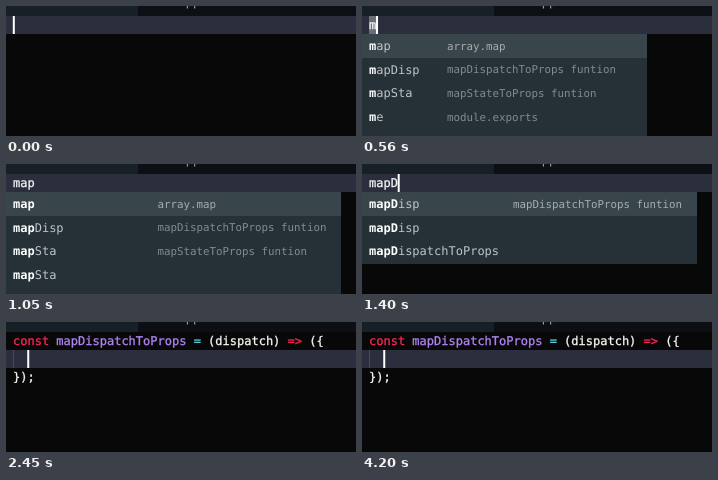
These frames come from a looping animation (350 px wide and 130 px high, 4270 ms). An HTML page:

```html
<!DOCTYPE html>
<html lang="en">
<head>
<meta charset="utf-8">
<title>Editor snippet completion</title>
<style>
  html, body { margin: 0; width: 100%; height: 100%; overflow: hidden; background: #080809; }
  svg { display: block; }
  text {
    font: 12px "DejaVu Sans Mono", "Liberation Mono", monospace;
    white-space: pre;
    text-rendering: geometricPrecision;
    fill: #f4f4f4;
  }
  .code { stroke-width: .3px; stroke: currentColor; }
  .label { fill: #bcc5c9; }
  .match { fill: #fff; font-weight: bold; }
  .note { font-size: 10.8px; fill: #7d8c94; }
  .first { fill: #a3adb2; }
  .tab { fill: #a0a6aa; }
</style>
</head>
<body>
<svg id="stage" width="350" height="130" viewBox="0 0 350 130"></svg>
<script>
const LOOP = 4270;
const LEFT = 7;
const CHAR = 7.224;
const LINE = 18;
const ROW = 23.7;
const stage = document.getElementById('stage');

function add(parent, tag, attrs, content) {
  const el = document.createElementNS('http://www.w3.org/2000/svg', tag);
  for (const key in attrs) el.setAttribute(key, attrs[key]);
  if (content) el.textContent = content;
  parent.appendChild(el);
  return el;
}

function rect(parent, x, y, width, height, fill) {
  return add(parent, 'rect', { x, y, width, height, fill });
}

function codeLine(parent, y, parts) {
  const line = add(parent, 'text', { x: LEFT, y, class: 'code' });
  for (const [content, color] of parts)
    add(line, 'tspan', { style: `fill:${color};color:${color}` }, content);
}

const DISPATCH = 'mapDispatchToProps funtion';
const STATE = 'mapStateToProps funtion';
const lists = {
  narrow: {
    width: 285, noteX: 85,
    rows: [['map', 'array.map'], ['mapDisp', DISPATCH], ['mapSta', STATE], ['me', 'module.exports']]
  },
  wide: {
    width: 335, noteX: 151.5,
    rows: [['map', 'array.map'], ['mapDisp', DISPATCH], ['mapSta', STATE], ['mapSta', '']]
  },
  short: {
    width: 335, noteX: 151,
    rows: [['mapDisp', DISPATCH], ['mapDisp', ''], ['mapDispatchToProps', '']]
  }
};

function drawList(parent, { width, noteX, rows }, matched) {
  rect(parent, 0, 28, width, rows.length > 3 ? 102 : 72, '#263137');
  rect(parent, 0, 28, width, 24, '#38454b');
  rows.forEach(([label, note], i) => {
    const y = 44 + i * ROW;
    const text = add(parent, 'text', { x: LEFT, y, class: 'label' });
    add(text, 'tspan', { class: 'match' }, label.slice(0, matched));
    add(text, 'tspan', {}, label.slice(matched));
    if (note) add(parent, 'text', { x: noteX, y: y - .5, class: i ? 'note' : 'note first' }, note);
  });
}

function drawSnippet(parent) {
  const white = '#f6f6f2', red = '#ff2558', purple = '#b084f5', cyan = '#5fd3ee';
  codeLine(parent, 23, [
    ['const ', red], ['mapDispatchToProps', purple], [' = ', cyan],
    ['(dispatch) ', white], ['=> ', red], ['({', white]
  ]);
  codeLine(parent, 23 + 2 * LINE, [['});', white]]);
  rect(parent, LEFT, 28, 1, LINE, '#464b5a');
}

// start, typed text, list, matched letters, caret shown
const steps = [
  [0, '', null, 0, true],
  [350, '', null, 0, false],
  [560, 'm', 'narrow', 1, true],
  [630, 'm', 'narrow', 1, true],
  [700, 'ma', 'narrow', 1, true],
  [770, 'ma', 'wide', 2, true],
  [1050, 'map', 'wide', 3, false],
  [1330, 'mapD', 'wide', 3, true],
  [1400, 'mapD', 'short', 4, true],
  [1610, 'mapD', 'short', 4, false],
  [2030, 'mapD', 'short', 4, true],
  [2100, 'mapDi', 'short', 5, true],
  [2450, null, null, 0, true],
  [2730, null, null, 0, false],
  [3150, null, null, 0, true],
  [3570, null, null, 0, false],
  [3990, null, null, 0, true]
];

rect(stage, 0, 0, 350, 130, '#080809');
rect(stage, 0, 0, 350, 10, '#0c1014');
rect(stage, 0, 0, 132, 10, '#172027');
add(stage, 'text', { x: 172.5, y: -.5, class: 'tab' }, 'App');

const scenes = steps.map(([start, typed, list, matched, caret]) => {
  const group = add(stage, 'g', { display: 'none' });
  const done = typed === null;
  const top = done ? 28 : 10;
  rect(group, 0, top, 350, LINE, '#2b2f3d');
  if (done) drawSnippet(group);
  else codeLine(group, 23, [[typed, '#f4f4f4']]);
  if (start === 560) {
    const ghost = rect(group, LEFT, top, CHAR, LINE, '#ffffff');
    ghost.setAttribute('opacity', .3);
  }
  if (list) drawList(group, lists[list], matched);
  if (caret) rect(group, LEFT + CHAR * (done ? 2 : typed.length) - .2, top, 2, LINE, '#fff');
  return group;
});

let shown = -1;
const origin = performance.now();

function frame(now) {
  const time = Math.max(0, now - origin) % LOOP;
  const index = steps.filter(step => step[0] <= time).length - 1;
  if (index !== shown) {
    if (shown >= 0) scenes[shown].setAttribute('display', 'none');
    scenes[index].removeAttribute('display');
    shown = index;
  }
  requestAnimationFrame(frame);
}
frame(origin);
</script>
</body>
</html>
```
